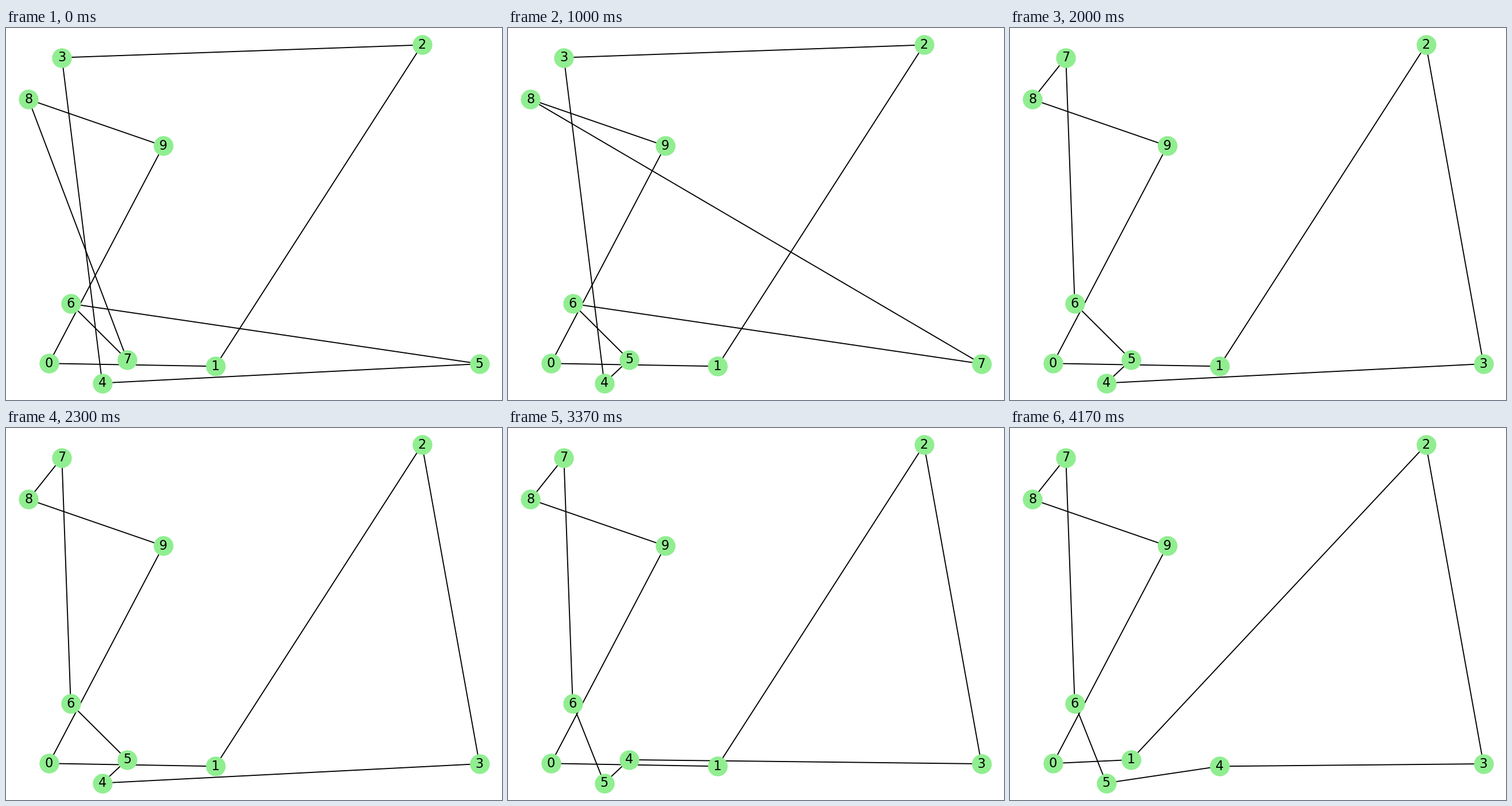
A matplotlib script that plays this animation: 864x648 px, repeating every 5.01 s.

```python
import numpy as np
import matplotlib.pyplot as plt
from matplotlib.animation import FuncAnimation
from matplotlib.collections import LineCollection

W, H, DPI = 864, 648, 135
INTERVAL, FRAMES = 10, 501
STEP_MS = 1000
MARGIN = 0.05 / 1.1  # 5 % padding around the data, as a share of the stage

# The outermost cities sit exactly on the padding
LEFT, TOP = W * MARGIN, H * MARGIN
RIGHT, BOTTOM = W - LEFT, H - TOP
CITIES = np.array([
    (74.8, 584.3), (364.7, 589.3), (724.7, TOP), (97.3, 51.6), (167.7, BOTTOM),
    (RIGHT, 585), (112.8, 480.3), (211, 577.9), (LEFT, 124.4), (274, 205.4),
])
SWAPS = [(5, 7), (3, 7), (4, 5), (1, 4)]


def tour_at(step):
    """Visiting order after the first `step` exchanges of two stops."""
    tour = np.arange(len(CITIES))
    for a, b in SWAPS[:step]:
        tour[[a, b]] = tour[[b, a]]
    return tour


plt.rcParams["font.family"] = "DejaVu Sans"
fig = plt.figure(figsize=(W / DPI, H / DPI), dpi=DPI, facecolor="white")
ax = fig.add_axes([0, 0, 1, 1])
ax.set_xlim(0, W)
ax.set_ylim(H, 0)
ax.axis("off")

edges = LineCollection([], colors="black", linewidths=1.0, zorder=1)
ax.add_collection(edges, autolim=False)
ax.scatter(*CITIES.T, s=300, c="lightgreen", zorder=2)
labels = [ax.text(0, 0, str(i), size=12, ha="center", va="center", zorder=3)
          for i in range(len(CITIES))]


def update(frame):
    stops = CITIES[tour_at(frame * INTERVAL // STEP_MS)]
    edges.set_segments(np.stack([stops, np.roll(stops, -1, axis=0)], axis=1))
    for label, stop in zip(labels, stops):
        label.set_position(stop)
    return [edges, *labels]


anim = FuncAnimation(fig, update, frames=FRAMES, interval=INTERVAL,
                     repeat=True, repeat_delay=0, blit=False)
plt.show()
```
